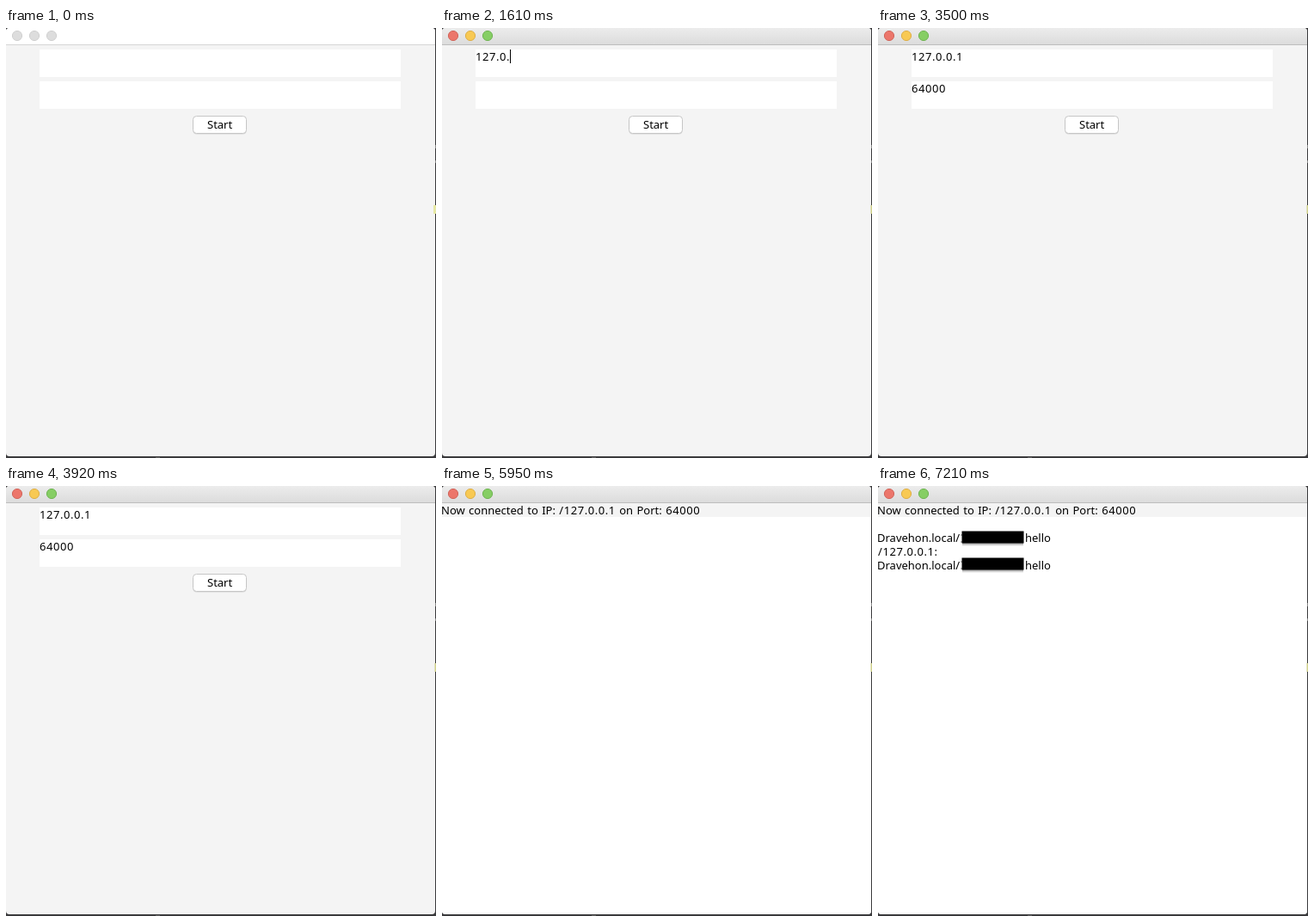
These frames come from a looping animation (500x500 px, 7280 ms). An HTML page:

```html
<!DOCTYPE html>
<html lang="en">
<head>
<meta charset="utf-8">
<title>Chat window</title>
<style>
  html, body { margin: 0; width: 100%; height: 100%; overflow: hidden; background: #3a3a3c; }
  svg { display: block; width: 100%; height: 100%; }
  text { font: 13px "Noto Sans", "Open Sans", sans-serif; word-spacing: 1px; fill: #000; white-space: pre; }
  .num { letter-spacing: .56px; }
</style>
</head>
<body>
<svg viewBox="0 0 500 500" xmlns="http://www.w3.org/2000/svg">
  <defs>
    <linearGradient id="bar" x2="0" y2="1">
      <stop offset="0" stop-color="#ececec"/>
      <stop offset="1" stop-color="#dcdcdc"/>
    </linearGradient>
    <linearGradient id="soft" x2="0" y2="1">
      <stop offset="0" stop-color="#000" stop-opacity=".45"/>
      <stop offset="1" stop-color="#000" stop-opacity="0"/>
    </linearGradient>
    <clipPath id="frame"><rect width="499" height="498" rx="4"/></clipPath>
    <g id="cover">
      <path d="M96.5 3h1v2h-1zM96.5 11h1v2h-1z" fill="#777"/>
      <rect x="98" y="13" width="71" height="4" fill="url(#soft)"/>
      <rect x="97.5" y="-.5" width="72" height="14"/>
    </g>
  </defs>

  <!-- desktop showing past the window edge -->
  <rect width="500" height="500" fill="#3a3a3c"/>
  <path d="M499 136h1v4h-1zM499 154h1v3h-1z" fill="#8a8a8a"/>
  <rect x="174" y="499" width="5" height="1" fill="#666"/>

  <g clip-path="url(#frame)">
    <rect width="499" height="498" fill="#f4f4f4"/>
    <rect id="barFill" width="499" height="19"/>
    <rect id="barLine" y="19" width="499" height="1"/>
    <g id="lights"></g>

    <g id="login">
      <rect x="39" y="25" width="420" height="32" fill="#fff"/>
      <rect x="39" y="62" width="420" height="32" fill="#fff"/>
      <rect x="217.5" y="103.5" width="62" height="20" rx="4" fill="#b9b9b9" opacity=".55"/>
      <rect x="217.5" y="102.5" width="62" height="20" rx="4" fill="#fff" stroke="#c6c6c6"/>
      <text x="234" y="117">Start</text>
      <text id="host" class="num" x="39" y="38"></text>
      <text id="port" class="num" x="39" y="75"></text>
    </g>

    <g id="chat">
      <rect y="36" width="499" height="462" fill="#fff"/>
      <text x="-1" y="33">Now connected to IP: <tspan class="num">/127.0.0.1</tspan> on Port: <tspan class="num">64000</tspan></text>
      <g id="sent">
        <text x="-1" y="65">Dravehon.local/</text>
        <text x="171" y="65">hello</text>
        <use href="#cover" y="53"/>
      </g>
      <g id="echo">
        <text x="0" y="81"><tspan class="num">/127.0.0.1</tspan>:</text>
        <text x="-1" y="97">Dravehon.local/</text>
        <text x="171" y="97">hello</text>
        <use href="#cover" y="84"/>
      </g>
      <text id="entry" x="-1" y="495"></text>
    </g>
    <rect id="caret" width="1" height="16"/>
  </g>
  <rect id="glow" y="206" height="10"/>
</svg>

<script>
const LOOP = 7280;
const $ = id => document.getElementById(id);
const SVG = "http://www.w3.org/2000/svg";

// [time, value] steps; the last one reached holds
const at = (steps, t) => steps.reduce((v, [time, next]) => t >= time ? next : v, steps[0][1]);
const typing = (word, start, gap) =>
  [[0, ""], ...[...word].map((c, i) => [start + i * gap, word.slice(0, i + 1)])];

const ACTIVE = 560, CONNECT = 4060, SENT = 6860, ECHO = 7000;

const host = typing("127.0.0.1", 840, 140);
const port = typing("64000", 2380, 210);
const entry = [
  [0, "Enter text here"], [5180, ""],
  ...typing("hello", 6090, 140).slice(1),
  [SENT, ""]
];
const caret = [
  [0, ""], [700, "host"], [2170, "port"], [3500, ""],
  [4760, "entry"], [5950, ""], [6090, "entry"], [7210, ""]
];
const caretTop = { host: 25, port: 62, entry: 482 };

const colors = [["#ec766b", "#d0655b"], ["#f8c953", "#dcae48"], ["#86ce64", "#6fb352"]];
const lights = colors.map((c, i) => {
  const dot = document.createElementNS(SVG, "circle");
  dot.setAttribute("cx", 13 + 20 * i);
  dot.setAttribute("cy", 9);
  dot.setAttribute("r", 5.6);
  $("lights").append(dot);
  return dot;
});

const show = (id, on) => { $(id).style.display = on ? "" : "none"; };
const write = (id, value) => {
  if ($(id).textContent !== value) $(id).textContent = value;
};

function paint(t) {
  const active = t >= ACTIVE;
  $("barFill").setAttribute("fill", active ? "url(#bar)" : "#fff");
  $("barLine").setAttribute("fill", active ? "#bdbdbd" : "#d6d6d6");
  lights.forEach((dot, i) => {
    dot.setAttribute("fill", active ? colors[i][0] : "#dddddd");
    dot.setAttribute("stroke", active ? colors[i][1] : "#cfcfcf");
  });
  $("glow").setAttribute("x", active ? 498.5 : 497);
  $("glow").setAttribute("width", active ? 1.5 : 3);
  $("glow").setAttribute("fill", active ? "#cfd08a" : "#e6e8a4");

  show("login", t < CONNECT);
  show("chat", t >= CONNECT);
  show("sent", t >= SENT);
  show("echo", t >= ECHO);
  write("host", at(host, t));
  write("port", at(port, t));
  write("entry", at(entry, t));

  const field = at(caret, t);
  show("caret", field);
  if (field) {
    const left = field === "entry" ? 0 : 39;
    const wide = $(field).textContent ? $(field).getComputedTextLength() : 0;
    $("caret").setAttribute("x", left + Math.round(wide));
    $("caret").setAttribute("y", caretTop[field]);
  }
}

const begin = performance.now();
function tick() {
  paint((performance.now() - begin) % LOOP);
  requestAnimationFrame(tick);
}
paint(0);
requestAnimationFrame(tick);
</script>
</body>
</html>
```
